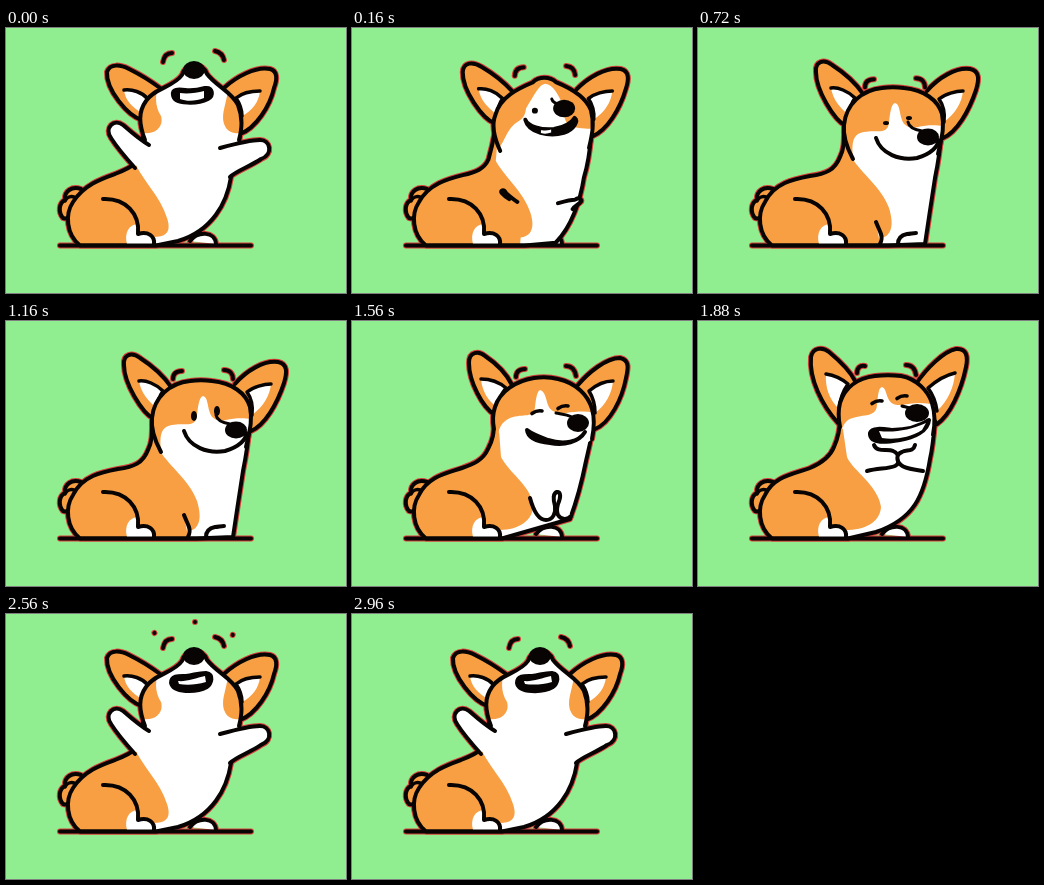
An HTML page with a canvas that plays this animation: 340 px wide and 265 px high, repeating every 3 s.

```html
<!DOCTYPE html>
<html lang="en">
<head>
<meta charset="utf-8">
<title>Happy corgi</title>
<style>
html, body { margin: 0; width: 100%; height: 100%; overflow: hidden; background: #90ee90; }
canvas { display: block; width: 340px; height: 265px; }
</style>
</head>
<body>
<canvas id="stage"></canvas>
<script>
const W = 340, H = 265, LOOP = 3000;
const INK = '#080404', FUR = '#f79f42', RIM = '#d8403a', WHITE = '#fff';
const canvas = document.getElementById('stage');
const ctx = canvas.getContext('2d');
const dpr = window.devicePixelRatio || 1;
canvas.width = W * dpr;
canvas.height = H * dpr;

// Poses: 0 arms up, 1 sitting, 2 crouching, 3 paws together, 4 laughing (0 unless given)
const KEYS = [[0, 0], [40, 0], [260, 1], [1440, 1], [1560, 2], [1880, 3], [2000, 3], [2160, 4], [LOOP, 4]];

const BODY = [
  'C78 157 95 151 109 146 C119 142 126 139 129 135 C128 130 134 116 138 106 L234 106 C232 125 230 138 225 149 C221 175 206 203 172 213 L150 217.5',
  'C76 155 96 151 112 148 C128 146 137 142 142 129 C146 121 146 114 146 104 L243 108 C242 125 239 140 237 150 C234 170 230 195 227 216 L190 217.5',
  'C76 155 96 152 110 147 C122 143 131 139 136 128 C141 119 142 112 142 100 L241 106 C239 118 237 128 234 140 C229 165 224 182 218 198 L150 217.5',
  'C76 155 96 153 112 147 C124 142 132 136 136 126 C140 117 142 110 142 98 L237 100 C236 112 235 125 232 138 C226 175 216 198 178 211 L150 217.5'];
const CHEST = [
  'M140 95 L130 137 C138 154 154 168 161 190 C165 202 162 209 148 209 L148 216',
  'M152 95 L154 130 C164 146 184 160 191 180 C196 196 194 207 184 210 L183 216',
  'M146 95 L149 136 C158 153 176 162 181 182 C183 198 168 209 148 209 L148 216',
  'M143 95 L149 136 C155 150 180 164 183 186 C182 202 166 209 148 209 L148 216'];
const HEAD = [
  'M139 112 C133 96 132 84 140 73 C148 60 168 59 176 47 C180 34 197 34 201 46 C210 58 226 64 232 77 C237 90 236 100 233 112',
  'M155 131 C148 118 145 106 146 97 C148 76 164 62 184 60 C192 59 198 59 206 60 C226 62 240 72 244 86 C247 100 243 112 240 126',
  'M142 108 C140 98 141 92 143 86 C148 70 164 60 182 57 C190 56 198 56 206 58 C224 62 236 74 240 88 C243 98 242 108 240 118',
  'M142 106 C140 96 140 90 142 82 C147 66 160 57 177 55 C185 54 195 54 203 55 C219 58 230 70 234 82 C237 92 237 104 235 114'];
const FACE_L = [
  'M136 105 C150 107 158 98 155 88 C150 80 149 72 151 62 C170 40 180 30 188 30',
  'M155 131 C154 118 153 106 166 104 C178 101 190 108 191 94 C192 86 193 76 197 75',
  'M149 136 C146 122 142 104 158 97 C172 92 182 98 183 86 C184 78 185 70 188 69',
  'M150 136 C141 122 141 106 150 99 C163 92 178 98 179 84 C180 76 180 67 184 66'];
const FACE_R = [
  'C200 30 215 45 222 62 C220 78 214 88 219 98 C222 105 230 106 237 105',
  'C202 76 201 84 204 92 C206 98 212 101 220 99 C228 97 238 97 245 98',
  'C193 70 194 78 196 84 C199 92 208 93 214 92 C226 90 236 90 245 92',
  'C188 67 188 74 191 79 C195 86 204 84 210 83 C222 81 232 82 242 86'];
const EAR_L = [
  'M136 92 C122 88 100 62 101 44 C104 35 115 37 123 41 C135 47 146 54 154 60',
  'M148 98 C136 92 118 62 118 44 C117 33 126 31 134 37 C148 46 159 57 165 66',
  'M143 94 C130 86 117 60 117 42 C117 30 127 30 133 35 C145 43 155 54 160 64',
  'M140 102 C124 84 111 58 113 36 C115 26 125 26 131 31 C143 41 152 50 157 60'];
const INNER_L = [
  'M118 62 C126 61 136 64 142 71 C139 76 137 82 137 86 C126 79 119 72 118 62',
  'M133 60 C140 59 150 63 157 70 C153 75 152 82 152 88 C142 80 135 72 133 60',
  'M129 58 C138 58 147 61 154 67 C149 73 146 80 146 87 C136 80 130 70 129 58',
  'M128 53 C135 54 144 58 150 63 C145 70 142 78 141 88 C131 78 127 66 128 53'];
const EAR_R = [
  'M218 60 C230 49 250 38 264 41 C272 43 271 52 268 60 C264 78 250 100 234 106',
  'M229 63 C240 50 258 39 272 41 C282 43 281 52 278 62 C271 83 259 104 245 110',
  'M226 64 C236 52 254 37 268 37 C278 39 276 48 274 57 C270 78 258 102 243 108',
  'M218 63 C228 48 246 30 258 28 C269 27 270 36 268 46 C263 70 252 94 239 103'];
const INNER_R = [
  'M254 63 C245 63 236 65 230 70 C234 76 236 82 236 88 C246 83 253 74 254 63',
  'M265 63 C258 63 247 66 241 71 C246 78 247 86 246 94 C258 85 264 74 265 63',
  'M261 60 C253 60 244 64 237 70 C242 78 243 85 243 92 C254 84 260 72 261 60',
  'M257 52 C248 54 238 60 230 67 C236 75 238 82 239 90 C250 80 256 66 257 52'];
const ARM_L = [
  'M129 140 C120 130 110 118 105 110 C98 100 108 90 117 97 C125 104 134 112 143 117',
  'M178 194 C180 199 182 203 183 206 C184 209 184 212 182 216 C182 216 182 216 182 216',
  'M178 177 C181 188 186 199 194 199 C201 199 204 192 203 185 C201 178 201 172 205 171',
  'M169 150 C180 147 190 148 197 145 C203 142 202 133 195 130 C190 127 179 132 176 124'];
const ARM_R = [
  'M224 149 C230 143 245 138 255 131 C268 126 264 112 254 112 C243 112 225 117 214 120',
  'M218 205 C215 205 212 206 209 206 C204 207 200 210 200 216 C200 216 200 216 200 216',
  'M219 195 C216 199 209 199 206 194 C204 190 205 187 206 183 C209 176 209 171 205 171',
  'M225 150 C215 148 207 148 203 144 C198 140 198 133 204 131 C208 128 215 132 217 124'];
const BROW_L = ['M157 34 C158 28 161 25 166 25', 'M167 58 C167 53 170 50 176 50',
  'M164 56 C164 51 167 48 173 48', 'M159 52 C159 47 162 44 167 45'];
const BROW_R = ['M209 23 C214 24 217 27 218 32', 'M218 49 C224 49 227 53 227 58',
  'M214 45 C220 45 223 49 224 55', 'M208 44 C213 44 217 47 218 54'];
const MOUTH = [
  'M167 67 C166 61 172 61 179 62 C186 63 192 62 199 60 C207 59 208 68 202 71 C192 76 168 77 167 67',
  'M178 110 C183 126 202 133 219 130 C233 126 241 118 240 112 C241 118 233 126 219 130 C202 133 183 126 178 110',
  'M175 109 C180 113 188 116 196 119 C212 124 227 121 233 111 C227 121 212 125 198 122 C186 121 176 117 175 109',
  'M172 112 C174 106 186 108 194 109 C208 109 222 105 231 99 C230 110 216 117 202 119 C190 121 171 124 172 112',
  'M165 69 C165 61 174 62 180 62 C188 61 192 59 200 59 C209 60 205 70 201 73 C190 79 167 79 165 69'];
const TEETH = [
  'M174 65 C181 66 191 65 198 63 L198 70 C190 73 182 74 174 71',
  'M200 130 C200 130 200 130 200 130 L200 130 C200 130 200 130 200 130',
  'M190 120 C190 120 190 120 190 120 L190 120 C190 120 190 120 190 120',
  'M181 110 C196 112 212 109 228 102 L224 109 C211 117 196 119 184 117',
  'M172 67 C180 68 190 64 199 62 L200 68 C190 71 180 71 173 70'];
const SNOUT = ['M186 40 C187 41 188 41 189 41', 'M210 94 C211 100 218 102 224 103',
  'M204 92 C209 93 214 93 220 96', 'M204 85 C207 86 210 86 213 88'];
const NOSE = ['188 42 11 9', '230 109 11 8.5', '226 102 11 9', '219 92 12 9'];
const EYES = ['176 66 198 64', '188 95 211 90', '185 91 211 86', '179 81 204 76'];
// Laugh marks: base x, y and direction
const MARKS = [[148.5, 19, -.5, -.86], [189, 8, 0, -1], [226.7, 21, .37, -.93]];

const clamp = x => Math.max(0, Math.min(1, x));
const smooth = x => x * x * (3 - 2 * x);
const easeOut = x => 1 - (1 - clamp(x)) ** 2;
const bump = (t, from, to) => Math.sin(Math.PI * clamp((t - from) / (to - from)));
const nums = s => s.match(/[\d.]+/g).map(Number);

function mix(a, b, k) {
  if (!k || a === b) return a;
  const to = nums(b);
  let i = 0;
  return a.replace(/[\d.]+/g, n => (+n + (to[i++] - n) * k).toFixed(2));
}

function poseAt(t) {
  let i = 0;
  while (i < KEYS.length - 2 && t >= KEYS[i + 1][0]) i++;
  const [t0, a] = KEYS[i], [t1, b] = KEYS[i + 1];
  const k = smooth(clamp((t - t0) / (t1 - t0)));
  const morph = part => mix(part[a] || part[0], part[b] || part[0], k);
  const weight = test => (test(a) ? 1 - k : 0) + (test(b) ? k : 0);
  return { morph, up: weight(p => p % 4 === 0), sit: weight(p => p === 1) };
}

let rim = false;
function ink(d, w = 4) {
  ctx.strokeStyle = rim ? RIM : INK;
  ctx.lineWidth = rim ? w + 2 : w;
  ctx.stroke(new Path2D(d));
}
function paint(d, colour) {
  if (rim) return;
  ctx.fillStyle = colour;
  ctx.fill(new Path2D(d));
}
function shape(d, colour) {
  paint(d, colour);
  ink(d);
}
function inside(mask, d) {
  ctx.save();
  ctx.clip(new Path2D(mask));
  paint(d, WHITE);
  ctx.restore();
}
function oval(x, y, rx, ry) {
  ctx.fillStyle = INK;
  ctx.beginPath();
  ctx.ellipse(x, y, rx, ry, 0, 0, 2 * Math.PI);
  ctx.fill();
}
function turned(x, y, angle, fn) {
  ctx.save();
  ctx.translate(x, y);
  ctx.rotate(angle);
  ctx.translate(-x, -y);
  fn();
  ctx.restore();
}

function ear(outer, inner) {
  shape(outer, FUR);
  paint(inner, WHITE);
  ink(inner.slice(0, inner.lastIndexOf('C')), 3.5);
}

function eye(x, y, open) {
  if (open > .3) oval(x, y, 3, 5 * open);
  else ink(`M${x - 5} ${y + 1.5} Q${x} ${y - 2} ${x + 5} ${y - 1}`, 3.6);
}

function marks(t) {
  for (const start of [2120, 2560]) {
    const u = (t - start) / 280;
    if (u <= 0 || u >= 1.25) continue;
    const tip = 14 * easeOut(u), tail = 14 * easeOut(u - .25);
    for (const [x, y, dx, dy] of MARKS)
      ink(`M${x + dx * tail} ${y + dy * tail} L${x + dx * tip} ${y + dy * tip}`);
  }
}

function corgi(t) {
  const { morph, up, sit } = poseAt(t);
  const blink = bump(t, 560, 760) + bump(t, 960, 1160);
  const spread = .035 * bump(t, 240, 400);
  const chuckle = t > 2200 && t < 2960 ? (1 - Math.cos(2 * Math.PI * (t - 2200) / 380)) / 2 : 0;

  // Tail and far foot
  shape('M75 161 C66 158 58 163 59 172 C53 175 52 184 57 190 C60 191 63 190 64 187', FUR);
  ink('M59 173 C61 169 65 168 68 169', 3.5);
  shape('M184 213 C192 203 209 203 210 216', WHITE);

  turned(150, 80, -spread, () => ear(morph(EAR_L), morph(INNER_L)));
  turned(238, 85, spread, () => ear(morph(EAR_R), morph(INNER_R)));

  const body = 'M74 217.5 C60 206 59 186 67 174 ' + morph(BODY) + 'Z';
  paint(body, FUR);
  inside(body, morph(CHEST) + 'L148 220 H250 V95Z');
  ink(body);

  // Hind leg
  paint('M121 216 C118 205 123 197 131 196 L132 206 C142 203 149 208 148 216Z', WHITE);
  ink('M97 171 C120 170 134 186 132 206 C142 203 149 208 148 216');

  const head = morph(HEAD);
  paint(head, FUR);
  inside(head + 'L200 150Z', morph(FACE_L) + morph(FACE_R) + 'V150 H150Z');
  ink(head);

  turned(136, 128, .05 * chuckle, () => shape(morph(ARM_L), WHITE));
  turned(220, 134, -.05 * chuckle, () => shape(morph(ARM_R), WHITE));

  ctx.save();
  ctx.translate(0, 2 * blink);
  ink(morph(BROW_L));
  ink(morph(BROW_R));
  ctx.restore();
  marks(t);
  ink('M54 217.5 L245 217.5');
  if (rim) return;

  const laugh = part => mix(morph(part), part[0], chuckle * .6);
  shape(laugh(MOUTH), INK);
  paint(laugh(TEETH), WHITE);
  if (up < .5) {
    const [x1, y1, x2, y2] = nums(morph(EYES));
    const open = sit * (1 - blink);
    eye(x1, y1, open);
    eye(x2, y2, open);
  }
  ink(morph(SNOUT), 3);
  oval(...nums(morph(NOSE)));
}

function draw(now) {
  const t = now % LOOP;
  ctx.setTransform(dpr, 0, 0, dpr, 0, 0);
  ctx.fillStyle = '#90ee90';
  ctx.fillRect(0, 0, W, H);
  ctx.lineCap = ctx.lineJoin = 'round';
  for (rim of [true, false]) corgi(t);
}

const start = performance.now();
function tick() {
  draw(performance.now() - start);
  requestAnimationFrame(tick);
}
tick();
</script>
</body>
</html>
```
